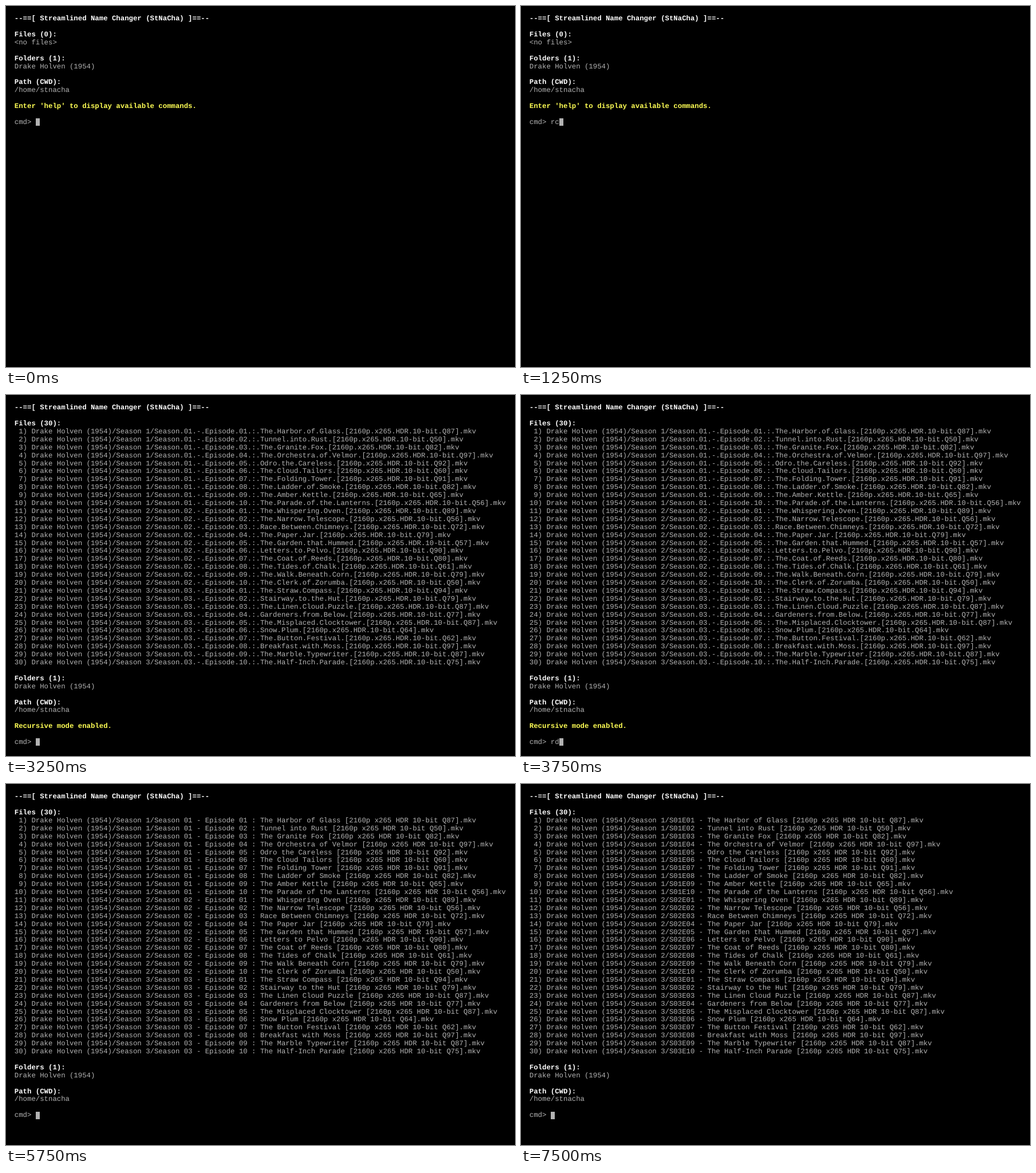
Recreate the animation shown at these times as an HTML page with a canvas. Size 889 by 630 pixels, loop 8000 ms.

```html
<!DOCTYPE html>
<html lang="en">
<head>
<meta charset="utf-8">
<title>Terminal</title>
<style>
  html, body { margin: 0; width: 100%; height: 100%; overflow: hidden; background: #000; }
  canvas { display: block; }
</style>
</head>
<body>
<canvas id="screen" width="889" height="630"></canvas>
<script>
const ctx = document.getElementById('screen').getContext('2d');

const GRAY = '#b2b2b2', WHITE = '#fff', YELLOW = '#ffff54';
const LEFT = 14.8, CELL = 7.405, LINE = 13.9;
const LOOP = 8000, STEP = 1250;
const SHOW = 'Drake Holven (1954)';

// Title and quality of each episode, ten per season
const episodes = `The Harbor of Glass|87
Tunnel into Rust|50
The Granite Fox|82
The Orchestra of Velmor|97
Odro the Careless|92
The Cloud Tailors|60
The Folding Tower|91
The Ladder of Smoke|82
The Amber Kettle|65
The Parade of the Lanterns|56
The Whispering Oven|89
The Narrow Telescope|56
Race Between Chimneys|72
The Paper Jar|79
The Garden that Hummed|57
Letters to Pelvo|90
The Coat of Reeds|80
The Tides of Chalk|61
The Walk Beneath Corn|79
The Clerk of Zorumba|50
The Straw Compass|94
Stairway to the Hut|79
The Linen Cloud Puzzle|87
Gardeners from Below|77
The Misplaced Clocktower|87
Snow Plum|64
The Button Festival|62
Breakfast with Moss|97
The Marble Typewriter|87
The Half-Inch Parade|75`.split('\n').map(line => line.split('|'));

const two = n => String(n).padStart(2, '0');

const spaced = (season, ep, rest) => `Season ${season} - Episode ${ep} : ${rest}`;
const dotted = (...parts) => spaced(...parts).replaceAll(' ', '.');
const short = (season, ep, rest) => `S${season}E${ep} - ${rest}`;

function fileList(format) {
  return episodes.map(([title, quality], i) => {
    const season = Math.floor(i / 10) + 1;
    const name = format(two(season), two(i % 10 + 1), `${title} [2160p x265 HDR 10-bit Q${quality}]`);
    return `${String(i + 1).padStart(2)}) ${SHOW}/Season ${season}/${name}.mkv`;
  });
}

const HELP = "Enter 'help' to display available commands.";
const RECURSIVE = 'Recursive mode enabled.';

const states = [
  { message: HELP, input: '' },
  { message: HELP, input: 'rc' },
  { format: dotted, message: RECURSIVE, input: '' },
  { format: dotted, message: RECURSIVE, input: 'rd' },
  { format: spaced, input: '' },
  { format: spaced, input: 're "Season ([0-9]+) - Episode ([0-9]+) :" "S\\1E\\2 -"' },
  { format: short, input: '' },
];

function draw({ format, message, input }) {
  let row = 0;
  const print = (text, color = GRAY) => {
    ctx.font = `${color === GRAY ? 'normal' : 'bold'} 12.34px "Liberation Mono", monospace`;
    ctx.textRendering = 'geometricPrecision';
    ctx.fillStyle = color;
    ctx.fillText(text, LEFT, Math.round(25.25 + row++ * LINE));
  };
  const section = (heading, lines) => {
    print(heading, WHITE);
    lines.forEach(line => print(line));
    row++;
  };

  ctx.fillStyle = '#000';
  ctx.fillRect(0, 0, 889, 630);
  print('--==[ Streamlined Name Changer (StNaCha) ]==--', WHITE);
  row++;
  section(`Files (${format ? episodes.length : 0}):`, format ? fileList(format) : ['<no files>']);
  section('Folders (1):', [SHOW]);
  section('Path (CWD):', ['/home/stnacha']);
  if (message) {
    print(message, YELLOW);
    row++;
  }

  const prompt = 'cmd> ' + input;
  const x = LEFT + prompt.length * CELL;
  const left = Math.round(x);
  ctx.fillStyle = GRAY;
  ctx.fillRect(left, Math.round(15.5 + row * LINE), Math.round(x + CELL) - left, 13);
  print(prompt);
}

let shown = -1;
function tick() {
  const index = Math.floor(performance.now() % LOOP / STEP);
  if (index !== shown) draw(states[shown = index]);
  requestAnimationFrame(tick);
}
tick();
</script>
</body>
</html>
```
